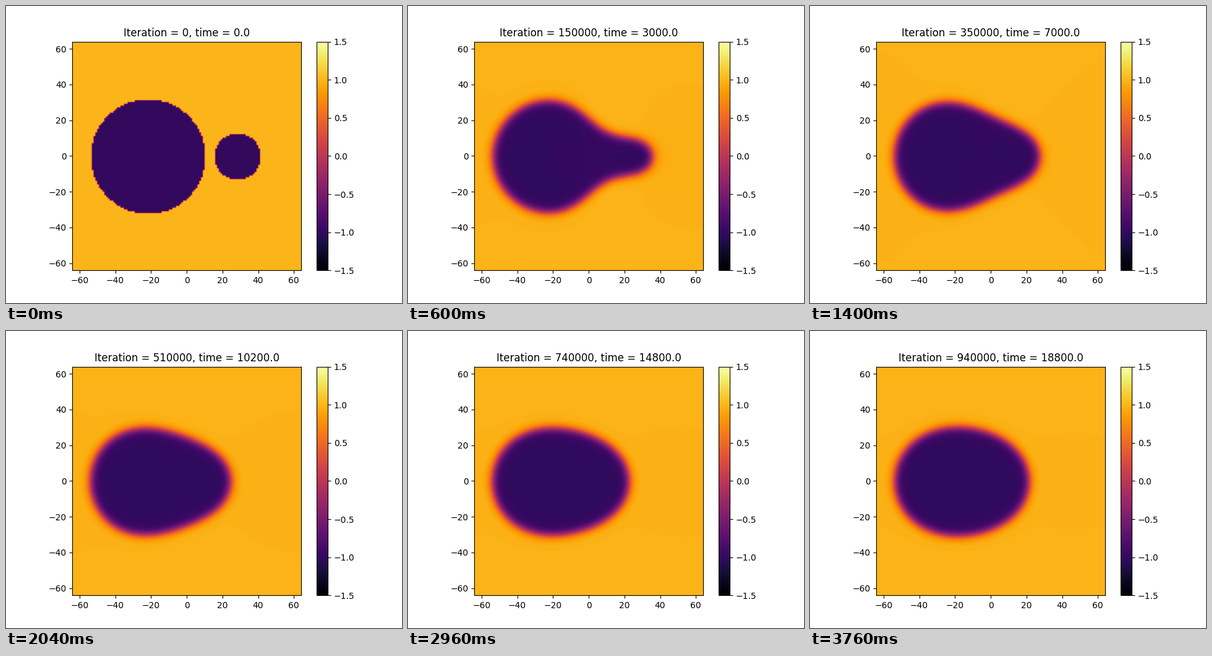
Animation of 640 by 480 pixels, one loop 3.8 s. Source, as a matplotlib script:

```python
import numpy as np
import matplotlib.pyplot as plt
from matplotlib.animation import FuncAnimation

# Two droplets merging under the Cahn-Hilliard equation, periodic box.
N = 128
FRAMES = 95
FRAME_MS = 40
ITERS_PER_FRAME = 10000
TIME_PER_FRAME = 200.0
SUBSTEPS = 50

WELL = 0.25        # double-well strength
KAPPA = 1.0        # gradient energy
STABILISER = 0.4   # implicit linear term


def droplets():
    y, x = np.mgrid[-N // 2:N // 2, -N // 2:N // 2]
    big = (x + 22) ** 2 + y ** 2 < 32 ** 2
    small = (x - 28) ** 2 + y ** 2 < 13 ** 2
    return np.where(big | small, -1.0, 1.0)


def simulate():
    dt = TIME_PER_FRAME / SUBSTEPS
    ky = 2 * np.pi * np.fft.fftfreq(N)[:, None]
    kx = 2 * np.pi * np.fft.rfftfreq(N)[None, :]
    k2 = 4 - 2 * np.cos(kx) - 2 * np.cos(ky)
    denom = 1 + dt * k2 * (STABILISER + KAPPA * k2)
    keep = (1 + dt * k2 * STABILISER) / denom
    push = dt * k2 * WELL / denom

    phi = droplets()
    spec = np.fft.rfft2(phi)
    fields = [phi]
    for _ in range(FRAMES - 1):
        for _ in range(SUBSTEPS):
            force = phi * (phi * phi - 1)
            spec = keep * spec - push * np.fft.rfft2(force)
            phi = np.fft.irfft2(spec, s=(N, N))
        fields.append(phi)
    return fields


fields = simulate()

fig, ax = plt.subplots(figsize=(6.4, 4.8), dpi=100)
half = N // 2
image = ax.imshow(fields[0], cmap="inferno", vmin=-1.5, vmax=1.5,
                  extent=(-half, half, -half, half))
fig.colorbar(image, ax=ax)
title = ax.set_title("")


def draw(i):
    image.set_data(fields[i])
    title.set_text(f"Iteration = {i * ITERS_PER_FRAME}, "
                   f"time = {i * TIME_PER_FRAME}")
    return image, title


anim = FuncAnimation(fig, draw, frames=FRAMES, interval=FRAME_MS,
                     repeat=True, repeat_delay=0, blit=False)
plt.show()
```
